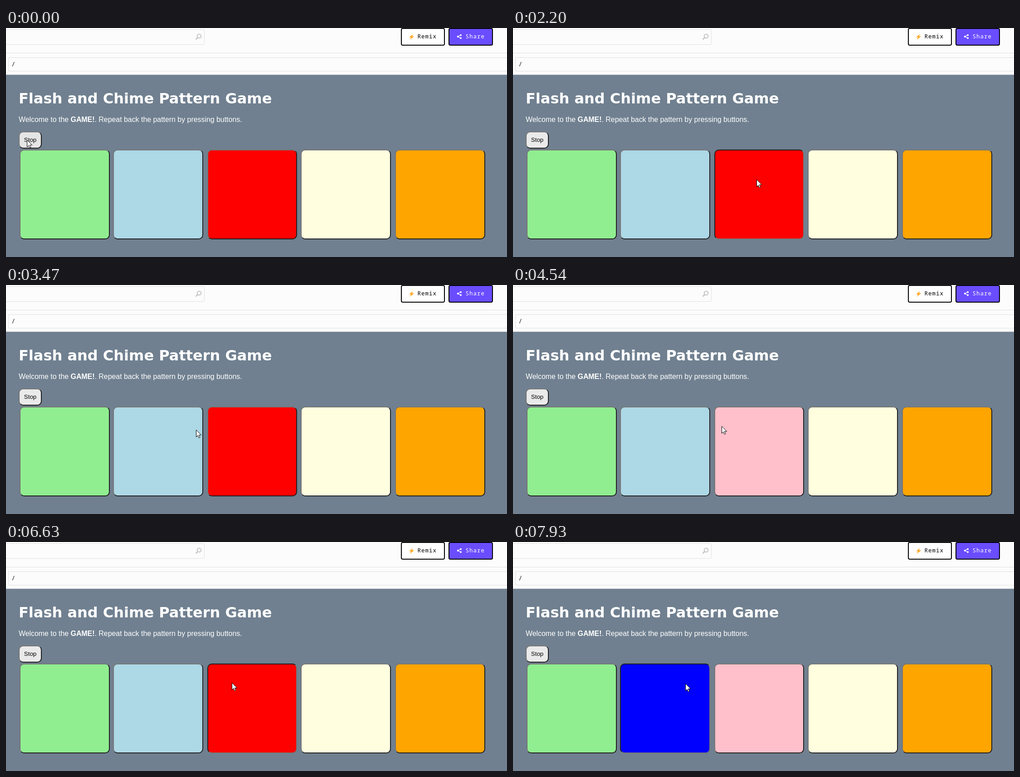
Recreate the animation shown at these times as an HTML page. Size 1105 by 507 pixels, loop 8 s.

```html
<!DOCTYPE html>
<html lang="en">
<head>
<meta charset="utf-8">
<title>Memory game</title>
<style>
html, body { margin: 0; width: 100%; height: 100%; overflow: hidden; background: #708090; }
body { position: relative; color: #fff; font: 15.9px "Liberation Sans", Arial, sans-serif; }
h1, p, .key, .bar, .cursor { position: absolute; margin: 0; box-sizing: border-box; white-space: nowrap; }
.bar { left: 0; top: 0; }
.bar text { font: 12.5px "Noto Sans Mono", monospace; letter-spacing: 1px; }
h1 { left: 28px; top: 136px; font: bold 32px/40px "DejaVu Sans", Verdana, sans-serif; }
p { left: 28px; top: 193px; line-height: 20px; }

.key { border: 2px outset #767676; border-radius: 10px; }
.stop {
  left: 28px; top: 229px; width: 51px; height: 38px;
  font-size: 13.25px; line-height: 34px; text-align: center; color: #000;
  background: #eaeaea; animation: hover 8s step-end infinite;
}
.pad { left: var(--x); top: 269px; width: var(--w, 199px); height: 199px; background: var(--rest); }
.red { animation: red 8s step-end infinite; }
.blue { animation: blue 8s step-end infinite; }
.cursor { left: 0; top: 0; animation: cursor 8s infinite; }

@keyframes hover {
  0% { background: #e5e5e5; }
  3.25%, 100% { background: #eaeaea; }
}
/* Lit with an outset edge: the game plays a clue. Lit with an inset edge: a press. */
@keyframes red {
  0%, 43.375% { background: #f00; border-style: outset; }
  10.75%, 31%, 56.625%, 90.25%, 100% { background: #ffc0cb; border-style: outset; }
  27.5%, 82.875% { background: #f00; border-style: inset; }
}
@keyframes blue {
  0%, 72.25% { background: #add8e6; border-style: outset; }
  60.05% { background: #00f; border-style: outset; }
  99.125%, 100% { background: #00f; border-style: inset; }
}
@keyframes cursor {
  0% { transform: translate(46px, 247px); animation-timing-function: step-end; }
  3.25% { transform: translate(46px, 247px); animation-timing-function: steps(8, start); }
  17.25% { transform: translate(242px, 318px); animation-timing-function: steps(6, start); }
  27.5% { transform: translate(537px, 335px); animation-timing-function: step-end; }
  32.7% { transform: translate(537px, 335px); animation-timing-function: steps(4, start); }
  39.6% { transform: translate(419px, 320px); animation-timing-function: step-end; }
  53.125% { transform: translate(419px, 320px); animation-timing-function: steps(3, start); }
  58.375% { transform: translate(460px, 312px); animation-timing-function: steps(5, start); }
  66.9% { transform: translate(491px, 312px); animation-timing-function: step-end; }
  68.625% { transform: translate(492px, 312px); animation-timing-function: step-end; }
  79.375% { transform: translate(492px, 312px); animation-timing-function: steps(2, start); }
  82.875% { transform: translate(498px, 311px); animation-timing-function: step-end; }
  90.25% { transform: translate(498px, 311px); animation-timing-function: steps(5, start); }
  99.125%, 100% { transform: translate(380px, 313px); }
}
</style>
</head>
<body>
<svg class="bar" width="1105" height="104" viewBox="0 0 1105 104">
  <path fill="#fcfcfc" d="M0 0H1105V103.4H0Z"/>
  <g fill="none" stroke="#e0e0e0">
    <rect x="-9.5" y="3.5" width="447" height="33" rx="2"/>
    <path d="M0 55.5H1105M1105 65.5H5.5V95.5H1105"/>
  </g>
  <g fill="none" stroke="#c3c3c3" stroke-width="2">
    <circle cx="426" cy="18" r="4.3"/>
    <path stroke-width="2.6" d="M422.6 21.4L418.6 25.4"/>
  </g>
  <text x="12" y="85" fill="#222" style="font-size:14px">/</text>

  <rect x="872" y="1" width="95" height="37" rx="3" fill="#fff" stroke="#000" stroke-width="2"/>
  <path fill="#ffa51f" d="M897.5 13.5L889 20.5H893.5L890.5 26L900.5 18.5H895.5Z"/>
  <text x="907.5" y="23" fill="#000">Remix</text>

  <rect x="977" y="1" width="96" height="37" rx="3" fill="#694dff" stroke="#000" stroke-width="2"/>
  <g fill="#fff">
    <path fill="none" stroke="#fff" stroke-width="1.3" d="M1003 15.5L996.5 19L1003 22.5"/>
    <circle cx="1003" cy="15.8" r="2"/>
    <circle cx="996.7" cy="19" r="2"/>
    <circle cx="1003" cy="22.2" r="2"/>
    <text x="1013.5" y="23" style="font-weight:500">Share</text>
  </g>
</svg>

<h1>Flash and Chime Pattern Game</h1>
<p>Welcome to the <b>GAME!</b>. Repeat back the pattern by pressing buttons.</p>

<div class="key stop">Stop</div>
<div class="key pad" style="--x:30px;--rest:#90ee90"></div>
<div class="key pad blue" style="--x:236px;--rest:#add8e6"></div>
<div class="key pad red" style="--x:444px;--w:198px;--rest:#ffc0cb"></div>
<div class="key pad" style="--x:650px;--rest:#ffffe0"></div>
<div class="key pad" style="--x:858px;--rest:#ffa500"></div>

<svg class="cursor" width="13" height="20" viewBox="0 0 13 20">
  <path fill="#fff" stroke="#000" d="M.5 .8V16.5L4 13.1L6.4 18.6L8.9 17.5L6.5 12.1H11.6Z"/>
</svg>
</body>
</html>
```
